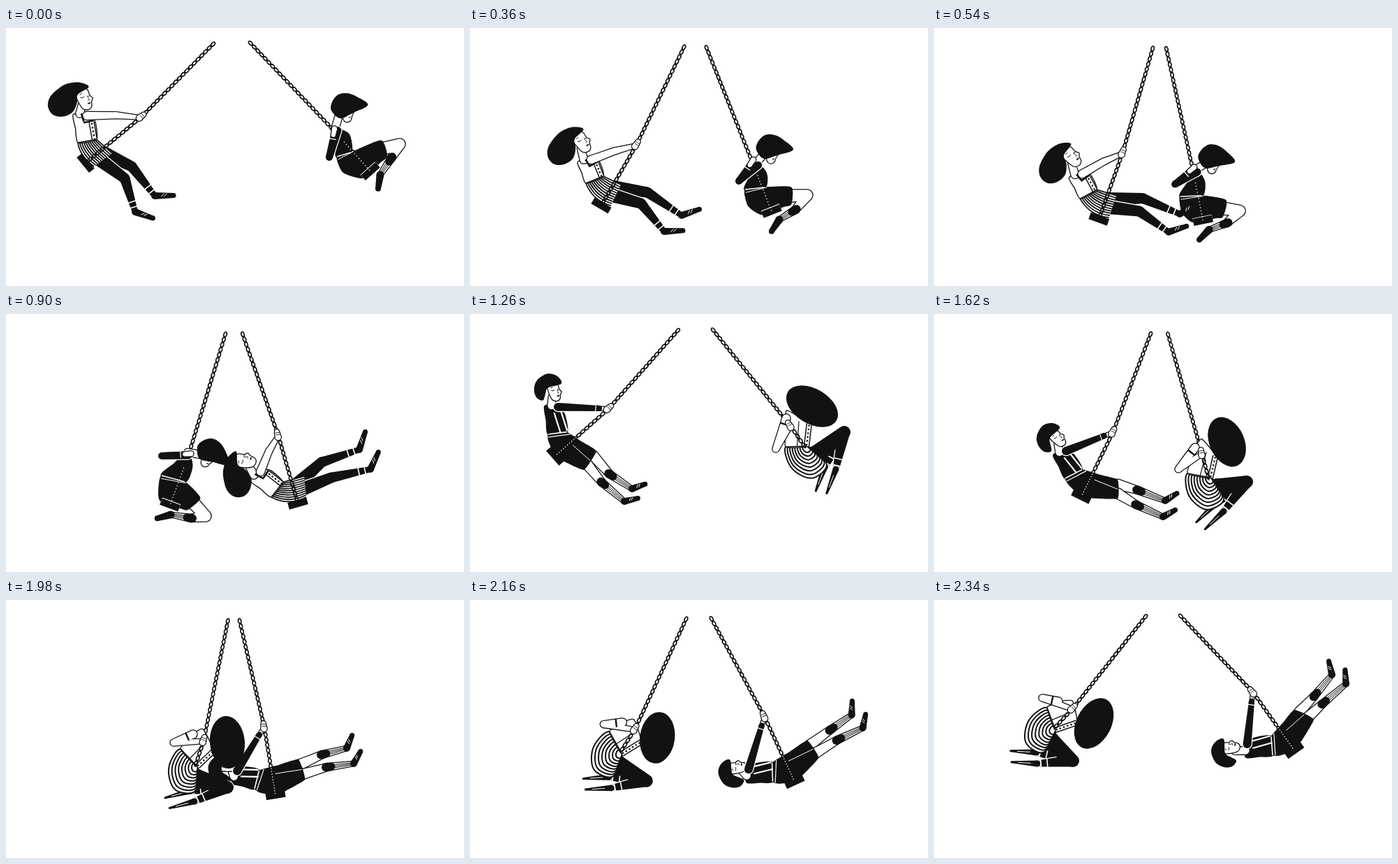
Recreate the animation shown at these times as an HTML page with a canvas. Size 656 px wide and 369 px high, loop 2520 ms.

```html
<!DOCTYPE html>
<html lang="en">
<head>
<meta charset="utf-8">
<title>Swings</title>
<style>
html, body { margin: 0; width: 100%; height: 100%; overflow: hidden; background: #fff; }
canvas { display: block; width: 656px; height: 369px; }
</style>
</head>
<body>
<canvas id="stage" width="656" height="369"></canvas>
<script>
const ctx = document.getElementById('stage').getContext('2d');
const INK = '#121212', PAPER = '#fff';
const STEP = 180, HALF = 7;
// Position along the swing for each step: first half, second half.
const PACE = [[0, 1.05, 2, 2.75, 3.85, 5, 6], [0, 1.15, 2, 3, 4, 5, 6]];

// Main joints at a few moments of a swing; all others follow by rule.
// "turn" adds a last pose: the previous one swung further by that angle.
const OPEN = 'hand end wb sb head chin hf hb k1 a1 k2 a2'.split(' ');
const girlOpen = { joints: OPEN, at: [0, 2, 5, 6], turn: -20, keys: [
  [193,128, 114,193, 103,164, 96,124, 111,101, 116,118, 152,179, 126,198, 180,198, 213,240, 170,215, 185,263],
  [238,168, 188,254, 166,222, 154,192, 159,163, 168,179, 216,224, 202,254, 254,235, 303,268, 245,251, 278,291],
  [390,174, 418,271, 380,262, 349,238, 341,211, 356,214, 427,232, 430,262, 452,212, 506,194, 466,234, 522,222]] };
const boyOpen = { joints: OPEN, at: [0, 2, 4, 6], keys: [
  [198,136, 122,203, 112,172, 107,132, 120,111, 123,125, 181,196, 163,223, 200,229, 232,250, 189,241, 221,268],
  [256,170, 211,261, 188,235, 171,202, 176,178, 186,190, 263,237, 263,264, 292,252, 331,267, 290,273, 328,290],
  [370,182, 386,279, 356,270, 324,262, 317,238, 330,240, 419,228, 428,257, 453,221, 488,212, 460,239, 498,234],
  [457,132, 516,215, 485,222, 447,225, 424,212, 438,212, 516,157, 544,171, 545,137, 570,107, 557,148, 590,120]] };
const boyTucked = {
  joints: 'hand end hairA hairB sh wb wf elbow hemT knee band ankle'.split(' '),
  at: [0, 2, 5, 6], turn: 13, keys: [
  [470,147, 522,205, 466,118, 519,110, 471,145, 474,184, 494,178, 463,185, 537,161, 564,166, 552,186, 536,210],
  [404,191, 432,262, 410,174, 463,174, 410,193, 394,231, 422,228, 385,219, 460,228, 483,239, 466,260, 443,274],
  [262,200, 235,273, 274,190, 316,214, 260,198, 223,231, 256,240, 223,203, 278,263, 286,289, 265,292, 236,287]] };
const girlTucked = {
  joints: 'hand hairA hairB sh wb wf elbow knee ankle'.split(' '),
  at: [0, 2, 4, 6], keys: [
  [459,160, 456,112, 524,152, 453,149, 452,190, 482,189, 438,193, 536,169, 524,222],
  [384,200, 405,150, 434,216, 374,191, 363,228, 396,234, 350,222, 448,240, 415,282],
  [283,202, 314,167, 320,240, 268,192, 250,213, 274,238, 240,204, 317,268, 270,288],
  [198,156, 246,143, 212,210, 178,145, 162,154, 174,186, 155,140, 199,230, 148,234]] };

const mix = (a, b, t) => [a[0] + (b[0] - a[0]) * t, a[1] + (b[1] - a[1]) * t];
const dist = (a, b) => Math.hypot(b[0] - a[0], b[1] - a[1]) || 1;

// Local pixel frame at a: u runs towards b, v to the left of it.
function frame(a, b) {
  const l = dist(a, b), x = (b[0] - a[0]) / l, y = (b[1] - a[1]) / l;
  return (u, v) => [a[0] + u * x + v * y, a[1] + u * y - v * x];
}

// Continues a limb past b with a bend to the left.
function beyond(a, b, length, degrees) {
  const r = degrees * Math.PI / 180;
  return frame(a, b)(dist(a, b) + length * Math.cos(r), length * Math.sin(r));
}

function swingOn(key, degrees) {
  const r = degrees * Math.PI / 180, c = Math.cos(r), s = Math.sin(r), pivot = 325;
  return key.map((v, i) => i % 2
    ? (key[i - 1] - pivot) * s + v * c
    : pivot + (v - pivot) * c - key[i + 1] * s);
}

// Lagrange interpolation through the key poses.
function pose({ joints, at, keys, turn }, o, reach) {
  const all = turn ? [...keys, swingOn(keys[keys.length - 1], turn)] : keys;
  const weights = at.map((a, i) =>
    at.reduce((w, b, j) => i === j ? w : w * (o - b) / (a - b), 1));
  const value = n => all.reduce((sum, key, i) => sum + key[n] * weights[i], 0);
  const p = Object.fromEntries(joints.map((name, i) => [name, [value(2 * i), value(2 * i + 1)]]));
  const side = p.hand[0] - 325;
  p.top = [325 + side * reach, 28 - side * side * .0004];
  if (p.end) {
    const at = frame(p.end, p.hand);
    p.s1 = at(0, 14);
    p.s2 = at(0, -14);
  }
  return p;
}

function openPose(figure, o, foot) {
  const p = pose(figure, o, .2), at = frame(p.sb, p.wb);
  p.sf = at(0, 18);
  p.wf = at(dist(p.sb, p.wb), 27);
  p.t1 = beyond(p.k1, p.a1, foot, 53);
  p.t2 = beyond(p.k2, p.a2, foot, 53);
  return p;
}

function boyTuckedPose(o) {
  const p = pose(boyTucked, o, .16);
  p.tf = frame(p.sh, p.wb)(9, 19);
  p.bum = frame(p.wb, p.wf)(2, -24);
  p.hemB = frame(p.wf, p.hemT)(dist(p.wf, p.hemT), -24);
  p.chin = frame(p.hairA, p.hairB)(21, -14);
  p.toe = beyond(p.band, p.ankle, 20, 25);
  return p;
}

function girlTuckedPose(o) {
  const p = pose(girlTucked, o, .16), at = frame(p.wb, p.wf);
  p.b1 = at(8, -31);
  p.b2 = at(36, -46);
  p.hem = at(58, -27);
  p.tf = at(35, 32);
  p.end = mix(p.wf, p.wb, .1);
  p.toe1 = beyond(p.knee, p.ankle, 37, -8);
  return p;
}

function line(pts, width, color = INK) {
  ctx.beginPath();
  pts.forEach(p => ctx.lineTo(...p));
  ctx.lineWidth = width;
  ctx.strokeStyle = color;
  ctx.stroke();
}

function dot(p, r, color) {
  ctx.beginPath();
  ctx.arc(...p, r, 0, 7);
  ctx.fillStyle = color;
  ctx.fill();
}

// Closed smooth curve; a larger k gives rounder corners.
function blob(pts, fill, stroke, width = 1.4, k = 1 / 6) {
  const n = pts.length, at = i => pts[(i + n) % n];
  ctx.beginPath();
  ctx.moveTo(...pts[0]);
  for (let i = 0; i < n; i++) {
    const [p, a, b, q] = [at(i - 1), at(i), at(i + 1), at(i + 2)];
    ctx.bezierCurveTo(a[0] + (b[0] - p[0]) * k, a[1] + (b[1] - p[1]) * k,
      b[0] - (q[0] - a[0]) * k, b[1] - (q[1] - a[1]) * k, ...b);
  }
  ctx.fillStyle = fill;
  ctx.fill();
  if (stroke) { ctx.strokeStyle = stroke; ctx.lineWidth = width; ctx.stroke(); }
}

// Tapered limb with an outline.
function limb(pts, widths, fill, edge) {
  for (const [color, grow] of [[edge, 1.3], [fill, 0]]) {
    if (!color) continue;
    const r = widths.map(w => w / 2 + grow);
    pts.forEach((p, i) => dot(p, r[i], color));
    for (let i = 1; i < pts.length; i++) {
      const l = dist(pts[i - 1], pts[i]), at = frame(pts[i - 1], pts[i]);
      ctx.beginPath();
      [at(0, r[i - 1]), at(l, r[i]), at(l, -r[i]), at(0, -r[i - 1])].forEach(p => ctx.lineTo(...p));
      ctx.fill();
    }
  }
}

function bands(a, b, places) {
  const l = dist(a, b), at = frame(a, b);
  for (const d of places) line([at(l * d, -6), at(l * d, 6)], 1.6, PAPER);
}

function chain(a, b) {
  const l = dist(a, b), at = frame(a, b), angle = Math.atan2(b[1] - a[1], b[0] - a[0]);
  for (let d = 3; d < l; d += 7.6) {
    ctx.beginPath();
    ctx.ellipse(...at(d, 0), 3.6, 2.1, angle, 0, 7);
    ctx.lineWidth = 1.7;
    ctx.strokeStyle = INK;
    ctx.stroke();
    line([at(d + 2.4, 0), at(d + 5.4, 0)], 2.2);
  }
}

function dots(a, b, color, gap = 4, r = 0.8) {
  const l = dist(a, b);
  for (let d = gap / 2; d < l; d += gap) dot(mix(a, b, d / l), r, color);
}

function seat(p) {
  line([p.s1, p.s2], 12, PAPER);
  line([p.s1, p.s2], 10);
}

function hand(p) {
  const at = frame(p.hand, p.top);
  limb([at(-2, 1), at(6, 0)], [8, 6], PAPER, INK);
  for (const u of [1, 4]) line([at(u, -3), at(u + 1, 3)], .9);
}

function shoe(ankle, toe) {
  limb([ankle, toe], [10, 7], INK);
  const l = dist(ankle, toe), at = frame(ankle, toe);
  for (const u of [.35, .5]) line([at(l * u, -1), at(l * (u + .15), 3)], 1, PAPER);
}

function sock(top, ankle) {
  const l = dist(top, ankle), at = frame(top, ankle);
  limb([top, ankle], [10, 6], PAPER, INK);
  for (const v of [-2.6, 0, 2.6]) line([at(0, v), at(l, v * .6)], 1);
  limb([at(-2, 0), at(6, 0)], [12, 11], INK);
}

function trim(a, b) {
  line([a, b], 8.5);
  line([a, b], 5.5, PAPER);
  dots(a, b, INK, 5.5, 1.3);
}

function head(p, size, hair) {
  const at = frame(p.head, p.chin), f = (v, u) => at(u * size, v * size);
  limb([f(-5, 8), mix(p.sb, p.sf, .55)], [9, 11], PAPER, INK);
  blob([f(-9, -10), f(2, -16), f(9, -11), f(10, -2), f(13, 3), f(10, 7), f(8, 14), f(2, 17), f(-6, 12)], PAPER, INK, 1.3);
  line([f(-4, -3), f(-1, -1.5), f(2, -2.5)], 1);
  line([f(6, -2), f(8, -1), f(9.5, -2)], 1);
  line([f(-4, -7), f(0, -8)], .9);
  line([f(6, -1), f(8, 4), f(5, 4)], .8);
  line([f(4, 8.5), f(8, 8.5)], 1.8);
  blob(hair.map(([v, u]) => at(u, v)), INK);
}

function drawGirlOpen(p) {
  chain(p.top, p.hand);
  seat(p);
  for (const [t, k, a, toe] of [[.28, p.k1, p.a1, p.t1], [.68, p.k2, p.a2, p.t2]]) {
    const hip = mix(mix(p.hf, p.hb, t), mix(p.wf, p.wb, t), .25);
    limb([hip, k, a], [20, 15, 8], INK, PAPER);
    bands(k, a, [.7, .86]);
    shoe(a, toe);
  }
  const bend = t => mix(p.s1, mix(p.wf, p.hf, .5), t);
  ctx.beginPath();
  ctx.moveTo(...p.wb);
  ctx.quadraticCurveTo(...bend(0), ...p.hb);
  ctx.lineTo(...p.hf);
  ctx.quadraticCurveTo(...bend(1), ...p.wf);
  ctx.fillStyle = PAPER;
  ctx.fill();
  for (let t = 0; t <= 1.01; t += .1) {
    ctx.beginPath();
    ctx.moveTo(...mix(p.wb, p.wf, t));
    ctx.quadraticCurveTo(...bend(t), ...mix(p.hb, p.hf, t));
    ctx.lineWidth = 1.8;
    ctx.strokeStyle = INK;
    ctx.stroke();
  }
  const front = frame(p.sf, p.wf), l = dist(p.sf, p.wf);
  blob([p.wb, mix(p.wb, p.sb, .5), p.sb, p.sf, front(l * .4, 8), p.wf], PAPER, INK, 1.4, .1);
  trim(front(l * .38, 3), mix(p.wf, p.wb, .1));
  line([front(l * .3, -8), front(l * .36, 7)], 2.6);
  line([p.wb, p.wf], 1.6);
  head(p, 1, [[12, -14], [1, -24], [-16, -27], [-30, -24], [-45, -16], [-52, -4], [-49, 9],
    [-37, 16], [-22, 15], [-11, 4], [-6, -8]]);
  limb([mix(p.sf, p.wf, .12), mix(p.sf, p.hand, .55), p.hand], [11, 9, 5], PAPER, INK);
  line([front(-1, -6), front(11, -7)], 2.6);
  chain(p.hand, p.end);
  hand(p);
}

function drawBoyOpen(p) {
  chain(p.top, p.hand);
  chain(p.hand, p.end);
  seat(p);
  for (const [t, k, a, toe] of [[.25, p.k1, p.a1, p.t1], [.72, p.k2, p.a2, p.t2]]) {
    limb([mix(p.hf, p.hb, t), k], [14, 10], PAPER, INK);
    sock(k, a);
    shoe(a, toe);
  }
  blob([p.wb, p.wf, mix(p.wf, p.hf, .5), p.hf, p.hb, mix(p.s1, p.s2, .6), mix(p.wb, p.s1, .5)], INK, null, 0, .06);
  line([mix(p.wf, p.hb, .35), mix(p.hf, p.hb, .5)], 1, PAPER);
  const front = frame(p.sf, p.wf), l = dist(p.sf, p.wf);
  blob([p.wb, mix(p.wb, p.sb, .5), p.sb, p.sf, front(l * .4, 5), p.wf], INK, INK, 2, .1);
  for (const v of [2, -8]) line([front(l * .22, v), front(l * .97, v - 1)], 2.2, PAPER);
  line([p.wb, p.wf], 1.6, PAPER);
  line([mix(p.wb, p.s1, .2), mix(p.wf, p.hf, .12)], 1.2, PAPER);
  head(p, .84, [[-27, -9], [-20, -21], [-4, -27], [9, -21], [13, -9], [-7, -7], [-13, 2], [-18, 9], [-26, 3]]);
  limb([mix(p.sf, p.wf, .08), mix(p.sf, p.hand, .82)], [12, 8], INK, PAPER);
  const arm = frame(p.hand, p.sf);
  limb([arm(9, 0), p.hand], [5, 5], PAPER, INK);
  limb([arm(17, 0), arm(13, 0)], [8, 8], INK);
  line([arm(18, -5), arm(18, 5)], 1.2, PAPER);
  dots(mix(p.hand, p.end, .55), p.end, PAPER);
  hand(p);
}

function drawBoyTucked(p) {
  chain(p.top, p.hand);
  chain(p.hand, p.end);
  limb([mix(p.hemT, p.hemB, .5), p.knee, p.band], [17, 15, 10], PAPER, INK);
  sock(p.band, p.ankle);
  limb([p.ankle, p.toe], [11, 8], INK);
  blob([p.wb, p.bum, p.s1, mix(p.s2, p.hemB, .3), p.hemB, p.hemT, p.wf], INK, INK, 1, .1);
  seat(p);
  limb([mix(p.hairA, p.chin, .5), p.sh], [10, 10], PAPER, INK);
  blob([p.sh, p.tf, p.wf, p.wb, mix(p.sh, p.wb, .5)], INK, INK, 3, .12);
  line([p.wb, p.wf], 1.5, PAPER);
  line([mix(p.wb, p.bum, .18), mix(p.wf, p.hemT, .08)], 1, PAPER);
  dots(mix(p.hand, p.end, .25), p.end, PAPER, 4.5);
  limb([mix(p.sh, p.tf, .2), p.elbow, mix(p.elbow, p.hand, .8)], [11, 10, 8], INK, PAPER);
  const arm = frame(p.hand, p.elbow);
  line([arm(12, -5), arm(12, 5)], 1.3, PAPER);
  limb([arm(6, 0), arm(-3, 0)], [6, 7], PAPER, INK);
  const at = frame(p.hairA, p.hairB), look = frame(p.chin, p.hairB);
  limb([mix(p.hairA, p.hairB, .42), p.chin], [22, 11], PAPER, INK);
  line([look(2, 4), look(6, 3)], 1.1);
  line([look(2, -1), look(5, -1)], 1.2);
  blob([at(0, 0), at(3, 12), at(13, 21), at(26, 21), at(39, 14), at(53, 0), at(30, -8), at(11, -13)], INK);
}

function drawGirlTucked(p) {
  chain(p.top, p.hand);
  const shin = frame(p.ankle, p.knee), shift = shin(0, 16);
  const aside = q => [q[0] + shift[0] - p.ankle[0], q[1] + shift[1] - p.ankle[1]];
  const leg = (foot, toe) => {
    limb([p.knee, foot], [17, 9], INK, PAPER);
    limb([foot, toe], [9, 3], INK, PAPER);
    bands(p.knee, foot, [.72, .9]);
    line([mix(foot, toe, .25), mix(foot, toe, .75)], 1, PAPER);
  };
  leg(aside(p.ankle), aside(p.toe1));
  leg(p.ankle, p.toe1);
  limb([mix(p.wf, p.hem, .48), p.knee], [27, 18], INK);
  const skirt = [p.wb, p.b1, p.b2, p.hem, p.wf];
  for (let s = 1; s > .1; s -= .115)
    blob(skirt.map(q => mix(p.wf, q, s)), PAPER, INK, 2);
  blob([p.wb, mix(p.wb, p.sh, .55), p.sh, mix(p.sh, p.hairA, .3), p.tf, p.wf], PAPER, INK, 1.4, .08);
  trim(p.tf, p.wf);
  line([mix(p.sh, p.tf, .55), mix(p.wb, p.wf, .55)], 1.2);
  line([p.wb, p.wf], 1.6);
  chain(p.hand, p.end);
  limb([p.sh, p.elbow, p.hand], [11, 9, 6], PAPER, INK);
  const arm = frame(p.sh, p.elbow);
  line([arm(9, -6), arm(9, 6)], 2.4);
  hand(p);
  const [a, b] = [p.hairA, p.hairB];
  ctx.beginPath();
  ctx.ellipse(...mix(a, b, .5), dist(a, b) / 2 + 1, 25, Math.atan2(b[1] - a[1], b[0] - a[0]), 0, 7);
  ctx.fillStyle = INK;
  ctx.fill();
}

let shown = -1;
function draw(now) {
  const step = Math.floor(now / STEP) % (2 * HALF);
  if (step === shown) return;
  shown = step;
  const half = step < HALF ? 0 : 1, o = PACE[half][step % HALF];
  ctx.fillStyle = PAPER;
  ctx.fillRect(0, 0, 656, 369);
  if (half) {
    drawBoyOpen(openPose(boyOpen, o, 20));
    drawGirlTucked(girlTuckedPose(o));
  } else {
    drawBoyTucked(boyTuckedPose(o));
    drawGirlOpen(openPose(girlOpen, o, 27));
  }
}

const start = performance.now();
function loop() {
  draw(performance.now() - start);
  requestAnimationFrame(loop);
}
loop();
</script>
</body>
</html>
```
